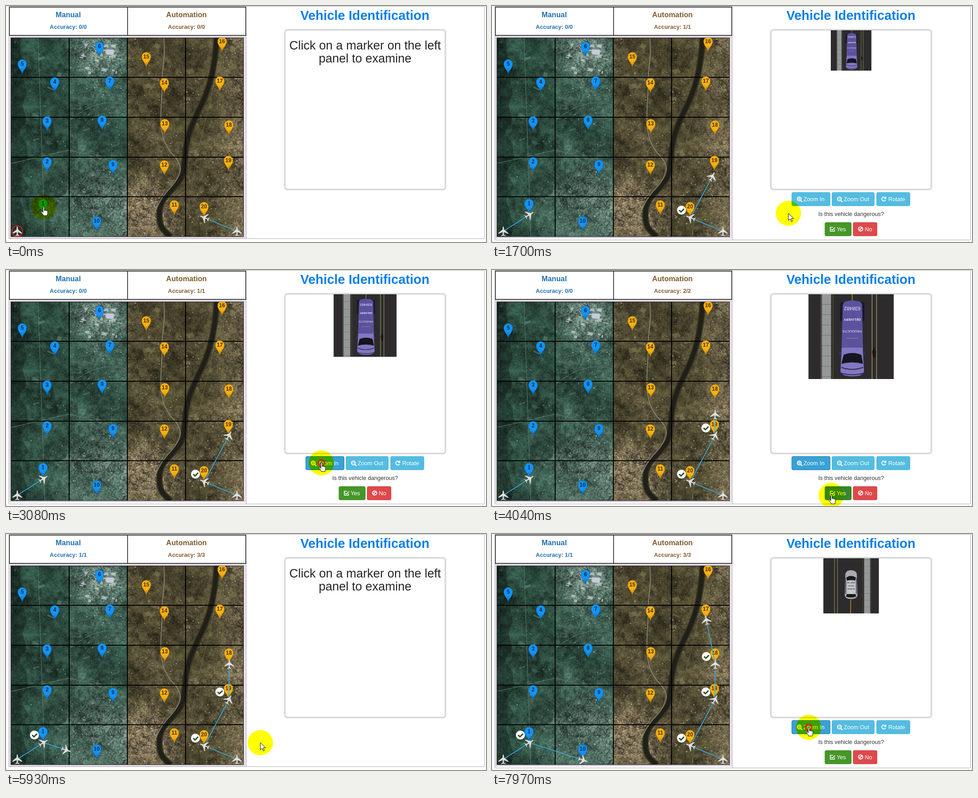
Animation, 1064 px wide and 526 px high, one loop 8 s. Source, as an HTML page with a canvas:

```html
<!DOCTYPE html>
<html lang="en">
<head>
<meta charset="utf-8">
<title>Vehicle Identification</title>
<style>
  html, body { margin: 0; width: 100%; height: 100%; overflow: hidden; }
  #stage { position: absolute; inset: 0; overflow: hidden; background: #fff; }
  canvas, svg, #halo { position: absolute; left: 0; top: 0; }
  #map { left: 11px; top: 71px; }
  #halo { width: 56px; height: 56px; margin: -28px; border-radius: 50%; background: #ff0; mix-blend-mode: multiply; }
  text { font-family: "Liberation Sans", Arial, sans-serif; }
  .bold { font-weight: bold; }
  .mid { text-anchor: middle; }
</style>
</head>
<body>
<div id="stage">
<canvas id="map" width="516" height="443"></canvas>
<svg width="1064" height="526">
  <defs>
    <clipPath id="mapClip"><rect x="11" y="71" width="516" height="443"/></clipPath>
    <linearGradient id="blue" x2="0" y2="1"><stop offset=".6" stop-color="#1294f6"/><stop offset="1" stop-color="#0d5fae"/></linearGradient>
    <linearGradient id="amber" x2="0" y2="1"><stop offset=".6" stop-color="#f9b110"/><stop offset="1" stop-color="#b87a08"/></linearGradient>
    <path id="pin" d="M0,23C-1,15 -10,9 -10,0A10,10 0 0 1 10,0C10,9 1,15 0,23Z"/>
    <path id="plane" fill="#e4e3df" stroke="#6c6a66" stroke-width=".5"
      d="M0,-11C1.4,-10 1.6,-8 1.6,-4L11,4V6L1.6,2L1.2,7L5,10V11L0,9.8L-5,11V10L-1.2,7L-1.6,2L-11,6V4L-1.6,-4C-1.6,-8 -1.4,-10 0,-11Z"/>
    <g id="road">
      <rect width="189" height="189" fill="#2d2b2c"/>
      <path d="M28,0V189" stroke="#4a4c4b" stroke-width="3"/>
      <path d="M40,0V189" stroke="#6d7370" stroke-width="20"/>
      <path d="M40,0V189" stroke="#949896" stroke-width="20" stroke-dasharray="22 1"/>
      <path d="M54.5,0V189" stroke="#55522c" stroke-width="1.5"/>
      <path d="M141,0V189M151,0V189" stroke="#858058" stroke-width="2"/>
    </g>
    <g id="van">
      <use href="#road"/>
      <path d="M97,0V16" stroke="#95831e" stroke-width="2"/>
      <path d="M145,118l5,10-2,13h-5l-2-13z" fill="#241416"/>
      <rect x="70" y="18" width="54" height="42" rx="2" fill="#191827"/>
      <path d="M76,24Q77,14 97,14Q118,14 119,24L121,130L123,172Q120,183 97,183Q74,183 71,172L73,130Z" fill="#5b529e"/>
      <path d="M74,119H120L123,172Q120,183 97,183Q74,183 71,172Z" fill="#8177c2"/>
      <path d="M78,135Q97,127 117,135L121,155Q97,149 73,155Z" fill="#15141f"/>
      <path d="M73,163Q97,172 121,163M72,176Q97,183 122,176" fill="none" stroke="#31294f" stroke-width="2"/>
      <path d="M68,129h5v5h-5zM121,129h5v5h-5z" fill="#373063"/>
      <path d="M84,98H110" stroke="#827c96" stroke-width="1.5"/>
      <g transform="rotate(180 97 58)" fill="#eeeaf4" class="mid" font-size="7.6">
        <text x="97" y="36">PRODUCTS</text>
        <text x="97" y="62" class="bold">DELIVERY</text>
        <text x="97" y="88" font-size="11">638482</text>
      </g>
    </g>
    <g id="car">
      <use href="#road" transform="rotate(180 94.5 94.5)"/>
      <path d="M93,143V189" stroke="#a87a14" stroke-width="3"/>
      <path d="M75,54Q78,41 94,41Q111,41 114,54L116,128Q113,140 94,140Q76,140 73,128Z" fill="#aaaab0"/>
      <path d="M78,66Q94,55 111,66L108,77Q94,72 81,77ZM80,123H109L112,131Q94,138 77,131Z" fill="#18191d"/>
      <path d="M76,68V122M113,68V122" stroke="#34363b" stroke-width="2"/>
      <rect x="81" y="77" width="27" height="45" fill="#c5c5c8"/>
      <g fill="#47474b" class="mid bold" font-size="5.2">
        <text x="94.5" y="86">WE CARRY</text><text x="94.5" y="97">GOODS</text><text x="94.5" y="108">PRODUCE</text>
      </g>
    </g>
  </defs>
  <g id="backdrop"></g>
  <g id="scene"></g>
</svg>
<div id="halo"></div>
<svg width="1064" height="526">
  <circle id="clickRing" r="7" fill="none" stroke="#f01808" stroke-width="3"/>
  <g id="pointer" fill="#fff" stroke="#000">
    <path id="arrow" d="M0,0V16L4,12.5L6.5,18.5L9,17.5L6.5,11.5H11.5Z"/>
    <path id="hand" d="M-1,1c0-2 3-2 3,0v7c0-1.5 2.6-1.5 2.6,.4c0-1.2 2.4-1.2 2.4,.6c0-1 2.3-1 2.3,.8v5c0,2-1.3,2.5-1.3,4.5h-8c0-2-3.5-5-5-8c-.7-1.6 1.2-2.5 2.4-1l1.6,2z"/>
  </g>
</svg>
</div>
<script>
const LOOP = 8000;
const $ = id => document.getElementById(id);
const fract = v => v - Math.floor(v);
const clamp = v => Math.min(1, Math.max(0, v));
const mix = (a, b, k) => a + (b - a) * k;

// ---------- aerial map ----------
const hash = (x, y) => fract(Math.sin(x * 12.9898 + y * 78.233) * 43758.5453);
function noise(x, y) {
  const i = Math.floor(x), j = Math.floor(y), ease = v => v * v * (3 - 2 * v);
  const u = ease(x - i), v = ease(y - j);
  return mix(mix(hash(i, j), hash(i + 1, j), u), mix(hash(i, j + 1), hash(i + 1, j + 1), u), v);
}
const blob = (x, y, cx, cy, r) => Math.exp(-(((x - cx) / r) ** 2) - ((y - cy) / r) ** 2);
// Built-up density: a town at the top, suburbs along the bottom, a strip on the right.
const density = (x, y) => clamp(
  blob(x, y, 195, 30, 50) + .5 * blob(x, y, 190, 380, 95) + .9 * blob(x, y, 305, 380, 65)
  + .5 * clamp((x - 430) / 80) + .3 * noise(x / 50, y / 50) * (x > 130));
const land = [
  { forest: [44, 75, 63], town: [100, 122, 111], fields: ["#86a593", "#274f42"] },
  { forest: [66, 62, 40], town: [122, 109, 84], fields: ["#9c9468", "#4a5932"] }
];
const landAt = x => land[x < 258 ? 0 : 1];

function paintMap() {
  const ctx = $("map").getContext("2d"), { width: w, height: h } = $("map");
  const image = ctx.createImageData(w, h);
  for (let y = 0, p = 0; y < h; y++) for (let x = 0; x < w; x++, p += 4) {
    const d = density(x, y), { forest, town } = landAt(x);
    let light = 1 + (noise(x / 40, y / 40) - .5) * .45 + (noise(x / 9, y / 9) - .5) * .45
      + (noise(x / 2.5, y / 2.5) - .5) * (.35 + .5 * d) + (hash(x, y) - .5) * .2;
    if (x < 18 + noise(y / 30, 7) * 20) light *= .72;
    for (let c = 0; c < 3; c++) image.data[p + c] = mix(forest[c], town[c], d) * light;
    image.data[p + 3] = 255;
  }
  ctx.putImageData(image, 0, 0);

  const patch = (x, y, width, height, turn, alpha, color) => {
    ctx.save();
    ctx.translate(x, y);
    ctx.rotate(turn);
    ctx.globalAlpha = alpha;
    ctx.fillStyle = color;
    ctx.fillRect(0, 0, width, height);
    ctx.restore();
  };
  for (let i = 0; i < 190; i++) {
    const x = 40 + hash(i, 1) * 476, y = hash(i, 2) * h;
    patch(x, y, 4 + hash(i, 5) * 13, 3 + hash(i, 6) * 9, hash(i, 3) < .5 ? .45 : -.3,
      .12 + hash(i, 4) * .28, landAt(x).fields[i % 2]);
  }
  for (let i = 0; i < 2600; i++) {
    const x = hash(i, 11) * w, y = hash(i, 12) * h;
    if (hash(i, 13) < density(x, y) + .04)
      patch(x, y, 1 + hash(i, 14) * 2, 1 + hash(i, 15) * 2, .4, .2 + hash(i, 16) * .5, x < 258 ? "#c3d2cb" : "#d6cbb2");
  }
  for (let i = 0; i < 24; i++)
    patch(145 + hash(i, 21) * 100, 12 + hash(i, 22) * 65, 3 + hash(i, 23) * 9, 2 + hash(i, 24) * 5, .2, .75, "#c3c9d2");
  patch(211, 26, 17, 11, 0, 1, "#c8c9dc");

  const stroke = (color, width, d) => {
    ctx.strokeStyle = color; ctx.lineWidth = width; ctx.stroke(new Path2D(d));
  };
  const river = "M456,0C452,70 440,110 424,145S390,210 386,260S380,310 364,330S329,360 329,394S342,430 353,443";
  stroke("#34331f", 14, river);
  stroke("#211f1a", 9, river);
  stroke("#85816b", 2, "M339,0C343,50 334,70 335,100S330,160 333,195S345,245 363,265S378,300 363,322S330,345 300,440");
  stroke("#6b674b", 1, "M470,0C455,80 440,150 430,190S405,290 400,340S440,390 516,440M400,240L516,205");
  stroke("#5f8474", 1, "M130,185Q190,130 258,150M0,280L130,250L258,285M60,0L75,443");
}

// ---------- fixed parts ----------
const text = (x, y, size, fill, body, cls = "mid") =>
  `<text x="${x}" y="${y}" font-size="${size}" fill="${fill}" class="${cls}">${body}</text>`;
const BLUE = "#2270ae", BROWN = "#805b30";
const pins = [
  [82, 440], [91, 347], [91, 256], [108, 169], [36, 129], [207, 90], [230, 167], [213, 254], [237, 353], [201, 479],
  [373, 443], [351, 354], [352, 262], [351, 171], [311, 113], [479, 79], [474, 167], [494, 265], [493, 344], [439, 447]
];
const drawPin = ([x, y], i) => `<g transform="translate(${x} ${y})">
  <use href="#pin" fill="url(#${i < 10 ? "blue" : "amber"})" stroke="${i < 10 ? "#0f5c9c" : "#a87408"}" stroke-width=".6"/>
  ${text(0, 4, 12, i < 10 ? "#0c2c50" : "#4a3000", i + 1, "mid bold")}</g>`;

$("backdrop").innerHTML = `
  <rect x="9" y="68.5" width="520.5" height="447.5" fill="none" stroke="#e4dce6" stroke-width="4"/>
  <path d="M7.5,2.5H531.5V65.5H7.5ZM269.5,2V66" fill="#fff" stroke="#000" stroke-width="1.4"/>
  <path d="M140,71V514M269,71V514M398,71V514M11,159H527M11,248H527M11,337H527M11,425H527" stroke="#000" stroke-width="2"/>
  <rect x="11" y="71" width="515.5" height="443" fill="none" stroke="#111"/>
  <g clip-path="url(#mapClip)">${pins.map(drawPin).join("")}</g>
  ${text(138, 25, 16.2, BLUE, "Manual", "mid bold")}
  ${text(400, 25, 16.2, BROWN, "Automation", "mid bold")}
  ${text(795.5, 31, 28.75, "#0c7fe9", "Vehicle Identification", "mid bold")}
  <rect x="618" y="53" width="356" height="356" rx="6" fill="#fff" stroke="#dcdcdc" stroke-width="4"/>`;

// ---------- flights, checks and scores ----------
// Each flight hops between pins; speed is in pixels per millisecond.
const flights = [
  { base: [512, 502], visits: [20, 19, 18, 17], departs: [-2340, 240, 3380, 5950], speed: .071 },
  { base: [25, 502], visits: [1, 10], departs: [60, 5330], speed: .088 }
];
const SCORE_LEAD = 130, VAN_ANSWER = 4300;
const autoChecks = flights[0].departs.slice(1);
const checks = [...autoChecks.map((at, i) => ({ pin: 20 - i, at })), { pin: 1, at: VAN_ANSWER }];

const drawPlane = ([x, y], angle = 0) => `<use href="#plane" transform="translate(${x} ${y}) rotate(${angle})"/>`;
function drawFlight({ base, visits, departs, speed }, t) {
  let from = base, lines = "", planes = drawPlane(base);
  visits.forEach((pin, i) => {
    const to = [pins[pin - 1][0] + 1, pins[pin - 1][1] + 25];
    const dx = to[0] - from[0], dy = to[1] - from[1];
    if (t >= departs[i]) {
      const k = clamp((t - departs[i]) * speed / Math.hypot(dx, dy));
      const at = [from[0] + dx * k, from[1] + dy * k];
      lines += `<path d="M${from}L${at}" stroke="#35abd9" stroke-width="1.8"/>`;
      planes += drawPlane(at, Math.atan2(dx, -dy) * 180 / Math.PI);
    }
    from = to;
  });
  return lines + planes;
}
const drawCheck = ({ pin }) => `<g transform="translate(${pins[pin - 1][0] - 19} ${pins[pin - 1][1] + 8})">
  <circle r="10" fill="#fff"/><path d="M-5,0l4,4l7,-7" fill="none" stroke="#1f5126" stroke-width="3"/></g>`;
const score = n => `Accuracy: ${n}/${n}`;

// ---------- inspection panel ----------
const series = (first, step, count) => Array.from({ length: count }, (_, i) => first + i * step);
const sessions = [
  { open: 900, loaded: 1000, close: VAN_ANSWER, image: "van", clicks: series(2480, 240, 6) },
  { open: 6700, loaded: 6920, close: LOOP, image: "car", clicks: series(7640, 240, 2) }
];
const lens = (x, sign) => `<circle cx="${x - 1}" cy="430" r="4.2"/><path d="M${x + 2},433l4,4"/><path d="${sign}" stroke-width="1.4"/>`;
const button = (x, y, w, fill, icon, label) => `<rect x="${x}" y="${y}" width="${w}" height="31" rx="4" fill="${fill}"/>
  <g fill="none" stroke="#fff" stroke-width="2">${icon}</g>${text(x + 26.5, y + 20, 12.7, "#fff", label, "")}`;

function drawPanel(t, session, overZoom, overYes) {
  if (!session) return text(796, 97, 27, "#262626", "Click on a marker on the left") + text(796, 126, 27, "#262626", "panel to examine");
  const zoom = session.clicks.filter(at => t >= at).length, size = 90 + 16.5 * zoom;
  const picture = t < session.loaded ? "" :
    `<use href="#${session.image}" transform="translate(${796 - size / 2} 54) scale(${size / 189})"/>`;
  const focus = zoom ? `<rect x="664.5" y="415.5" width="85" height="30" rx="4" fill="none" stroke="#2b7fb5"/>` : "";
  return picture
    + button(664, 415, 86, zoom || overZoom ? "#39a1d6" : "#54bce0", lens(682, "M678.5,430h5M681,427.5v5"), "Zoom In") + focus
    + button(753, 415, 95, "#54bce0", lens(771, "M767.5,430h5"), "Zoom Out")
    + button(852, 415, 75, "#54bce0", `<path d="M871.5,427.5A4.3,4.3 0 1 0 872.3,432M873,425v4h-4"/>`, "Rotate")
    + text(796, 468, 12.6, "#333", "Is this vehicle dangerous?")
    + button(737.5, 482, 59.5, overYes ? "#38872a" : "#469629", `<path d="M759,498v4h-9v-9h6M752,497l2.5,2.5l6,-6" stroke-width="1.7"/>`, "Yes")
    + button(800, 482, 54, "#de494b", `<circle cx="817" cy="497" r="4.6"/><path d="M820,494l-6,6"/>`, "No");
}

// ---------- pointer ----------
// Rests of the pointer; it glides between them and slows down on arrival.
const rests = [
  { x: 83, y: 448, from: 0, to: 600 },
  { x: 657, y: 462, from: 1700, to: 2000 },
  { x: 699, y: 430, from: 2350, to: 3740 },
  { x: 752, y: 502, from: 4000, to: 4350 },
  { x: 201, y: 480, from: 4950, to: 5290 },
  { x: 614, y: 463, from: 6560, to: 6950 },
  { x: 702, y: 431, from: 7450, to: LOOP }
];
function pointerAt(t) {
  const next = rests.find(r => t <= r.to), last = rests[rests.indexOf(next) - 1];
  if (t >= next.from) return [next.x, next.y];
  const k = 1 - (1 - (t - last.to) / (next.from - last.to)) ** 3;
  return [mix(last.x, next.x, k), mix(last.y, next.y, k)];
}
const allClicks = [...sessions.flatMap(s => s.clicks), VAN_ANSWER - 100, 5150];

function render(t) {
  const [px, py] = pointerAt(t);
  const over = (x, y, w, h) => px >= x && px <= x + w && py >= y && py <= y + h;
  const session = sessions.find(s => t >= s.open && t < s.close);
  const overZoom = session && over(664, 415, 86, 31), overYes = session && over(738, 482, 59, 31);
  const overPin = pins.slice(0, 10).some(([x, y]) => over(x - 10, y - 10, 20, 34));
  const bottom = session ? 521.5 : 518.5;
  const autoScore = autoChecks.filter(at => t >= at - SCORE_LEAD).length;

  $("scene").innerHTML = `
    <path d="M6.5,.5H1060.5V${bottom}H6.5ZM532.5,0V${bottom}" fill="none" stroke="#b1a8b0"/>
    ${text(138, 51, 12.6, BLUE, score(t < VAN_ANSWER ? 0 : 1), "mid bold")}
    ${text(400, 51, 12.6, BROWN, score(autoScore), "mid bold")}
    <g clip-path="url(#mapClip)">${flights.map(f => drawFlight(f, t)).join("")}</g>
    ${t < 60 ? `<circle cx="25" cy="502" r="12" fill="none" stroke="#d8201c" stroke-width="2"/>` : ""}
    ${checks.filter(c => t >= c.at).map(drawCheck).join("")}
    ${drawPanel(t, session, overZoom, overYes)}`;

  const hand = overZoom || overYes || overPin;
  const place = `translate(${px} ${py})`;
  $("halo").style.transform = `translate(${px}px, ${py}px)`;
  $("pointer").setAttribute("transform", place);
  $("clickRing").setAttribute("transform", place);
  $("clickRing").style.display = allClicks.some(at => t >= at && t < at + 160) ? "" : "none";
  $("hand").style.display = hand ? "" : "none";
  $("arrow").style.display = hand ? "none" : "";
}

paintMap();
const began = performance.now();
function tick() {
  render((performance.now() - began) % LOOP);
  requestAnimationFrame(tick);
}
tick();
</script>
</body>
</html>
```
